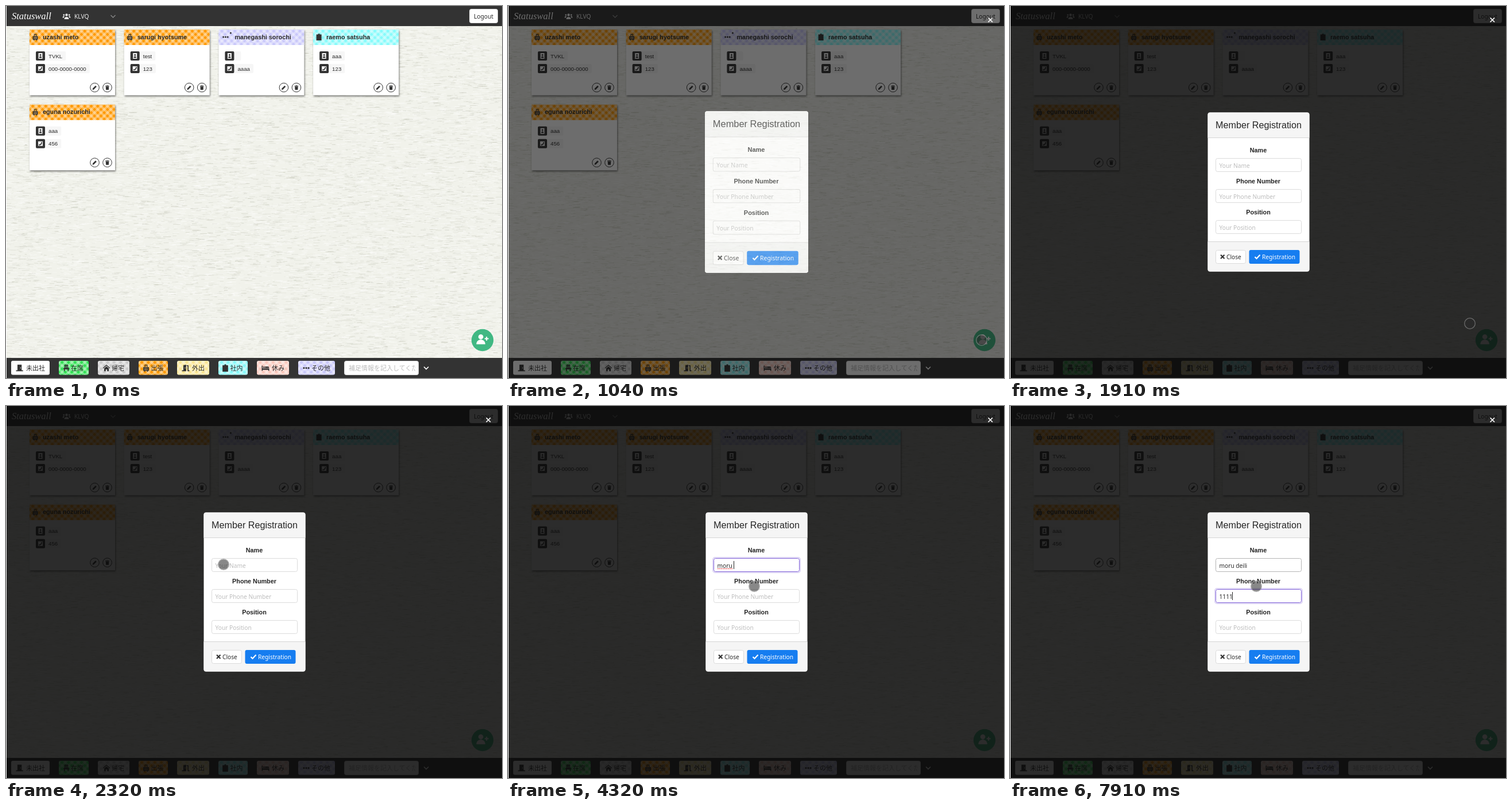
An HTML page with a canvas for the animation above (8 s loop, 864 px wide and 648 px high).

```html
<!DOCTYPE html>
<html lang="ja">
<head>
<meta charset="utf-8">
<title>Member board</title>
<style>
  html, body { margin: 0; width: 100%; height: 100%; overflow: hidden; background: #fff; }
  canvas, svg { position: absolute; left: 0; top: 0; }
  text { white-space: pre; font: 10.2px "Noto Sans", "Noto Sans CJK JP", sans-serif; fill: #2b2b2b; }
  .plain { font: 9.7px "Liberation Sans", sans-serif; }
  .bold { font: bold 10.8px "Liberation Sans", sans-serif; }
  .title { font: 16.15px "Liberation Sans", sans-serif; }
  .brand { font: italic 16.5px "Liberation Serif", serif; }
  .jp { font: 11px "Noto Sans CJK JP", sans-serif; }
  .card { filter: drop-shadow(1.5px 2px 1.5px rgba(0, 0, 0, .5)); }
  #modal { transform-origin: 433px 324px; }
</style>
</head>
<body>
<canvas id="paper" width="864" height="648"></canvas>
<svg id="stage" width="864" height="648" viewBox="0 0 864 648"></svg>
<script>
const LOOP = 8000;
const DARK = '#333';
const $ = id => document.getElementById(id);

// ---------- woven paper ----------
function drawPaper() {
  const ctx = $('paper').getContext('2d');
  let seed = 7;
  const random = () => (seed = (seed * 16807) % 2147483647) / 2147483647;
  ctx.fillStyle = '#f1f2eb';
  ctx.fillRect(0, 0, 864, 648);
  for (let i = 0; i < 22000; i++) {
    const x = random() * 880 - 16, y = 35 + random() * 580, length = 2 + random() * 12;
    ctx.strokeStyle = i % 2 ? `rgba(140,142,120,${0.06 + random() * 0.18})` : 'rgba(255,255,255,.5)';
    ctx.lineWidth = 0.6 + random() * 0.5;
    ctx.beginPath();
    ctx.moveTo(x, y);
    ctx.lineTo(x + length, y + random() * 0.8 - 0.4);
    ctx.stroke();
  }
}

// ---------- drawing helpers ----------
const rect = (x, y, w, h, fill, extra = '') =>
  `<rect x="${x}" y="${y}" width="${w}" height="${h}" fill="${fill}" ${extra}/>`;
const circle = (x, y, r, fill, extra = '') =>
  `<circle cx="${x}" cy="${y}" r="${r}" fill="${fill}" ${extra}/>`;
const text = (x, y, value, kind = '', fill = '#2b2b2b', extra = '') =>
  `<text x="${x}" y="${y}" class="${kind}" style="fill:${fill}" ${extra}>${value}</text>`;
const line = (d, color, width) =>
  `<path d="${d}" fill="none" stroke="${color}" stroke-width="${width}"/>`;
const group = (x, y, content) => `<g transform="translate(${x} ${y})">${content}</g>`;

// Shapes on a 16 x 16 grid
const ICONS = {
  dots: 'M1 8a2 2 0 1 1 4 0a2 2 0 1 1-4 0M6 8a2 2 0 1 1 4 0a2 2 0 1 1-4 0M11 8a2 2 0 1 1 4 0a2 2 0 1 1-4 0',
  luggage: 'M5 6V1h6v5h3v8h-2v2h-2v-2H6v2H4v-2H2V6zM6.5 6h3V2.5h-3zM4 8h8v1H4zM4 11h8v1H4z',
  clipboard: 'M2 2h4a2 2 0 0 1 4 0h4v14H2z',
  door: 'M3 1h9v12h3v2H0v-2h3zM9 7h1.5v2H9z',
  doorOpen: 'M3 2l6-1v14H0v-2h3zM10 2h4v11h2v2h-4V4h-2zM6 7h1.5v2H6z',
  chair: 'M4 1h8v7h2v3h-1v4h-2v-4H5v4H3v-4H2V8h2zM6 3v5h1V3zM9 3v5h1V3z',
  house: 'M8 1l8 7-1 1.2L8 3 1 9.2 0 8zM8 4.5l5 4.5v6H9.5v-4h-3v4H3V9z',
  bed: 'M0 3h2v6h14v5h-2v-2H2v2H0zM7 5h6a3 3 0 0 1 3 3H7zM3 6.5a1.7 1.7 0 1 1 3.4 0a1.7 1.7 0 1 1-3.4 0',
  pencil: 'M1 15l1-4.5 8.5-8.5 3.5 3.5-8.5 8.5z',
  trash: 'M2 2h4l1-1h2l1 1h4v2H2zM3 5h10l-.7 10H3.7z',
  badge: 'M2 0h12a2 2 0 0 1 2 2v12a2 2 0 0 1-2 2H2a2 2 0 0 1-2-2V2a2 2 0 0 1 2-2zM4.5 3v10h7V3zM6.5 6.2a1.5 1.5 0 1 1 3 0a1.5 1.5 0 1 1-3 0M5.8 11.5c0-4 4.4-4 4.4 0z',
  phone: 'M2 0h12a2 2 0 0 1 2 2v12a2 2 0 0 1-2 2H2a2 2 0 0 1-2-2V2a2 2 0 0 1 2-2zM4 4v8h8V4zM5 11l.5-2 1.5.4 2.4-2.4-.4-1.5 2-.5c0 4-2 6-6 6z',
  users: 'M5.3 5a2.7 2.7 0 1 1 5.4 0a2.7 2.7 0 1 1-5.4 0M3 14c0-6.5 10-6.5 10 0zM.5 5a1.7 1.7 0 1 1 3.4 0a1.7 1.7 0 1 1-3.4 0M12.1 5a1.7 1.7 0 1 1 3.4 0a1.7 1.7 0 1 1-3.4 0M-.5 11c0-4 3-4 4-3l-1.5 3zM16.5 11c0-4-3-4-4-3l1.5 3z',
  userPlus: 'M2.2 4.2a3.5 3.5 0 1 1 7 0a3.5 3.5 0 1 1-7 0M-.5 14.5c0-8.5 12.4-8.5 12.4 0zM13 4h1.5v2h2v1.5h-2v2H13v-2h-2V6h2z'
};
const icon = (name, cx, cy, size, fill = DARK) =>
  `<path d="${ICONS[name]}" fill="${fill}" fill-rule="evenodd" transform="translate(${cx - size / 2} ${cy - size / 2}) scale(${size / 16})"/>`;

const CHECKS = { green: '#2fe052', gray: '#cacaca', orange: '#ff9800', yellow: '#fbe591', cyan: '#85fbfb', pink: '#fbc8bc', lilac: '#c9c8fa' };
const checkPattern = ([name, color]) =>
  `<pattern id="${name}" width="8" height="8" patternUnits="userSpaceOnUse" patternTransform="rotate(45)">
    ${rect(0, 0, 8, 8, color)}${rect(0, 0, 4, 8, '#fff', 'opacity=".35"')}${rect(0, 0, 8, 4, '#fff', 'opacity=".35"')}
  </pattern>`;

const measurer = document.createElement('canvas').getContext('2d');
function textWidth(value, font) {
  measurer.font = font;
  return measurer.measureText(value).width;
}

// ---------- board ----------
function card(column, row, color, symbol, name, position, phone) {
  const detail = (top, glyph, value) =>
    rect(11, top, 28 + textWidth(value, '9.7px "Liberation Sans"'), 16, '#f6f6f6', 'rx="2"') +
    icon(glyph, 19, top + 8, 16) + text(33, top + 11.5, value, 'plain');
  const action = (x, glyph) =>
    circle(x, 101, 7.8, '#fff', `stroke="${DARK}"`) + icon(glyph, x, 101, 9);
  const wide = symbol === 'dots';
  return group(41 + column * 164.7, 41 + row * 130.7,
    rect(0, 0, 149, 114.5, '#fff', 'class="card"') +
    rect(0, 0, 149, 27, `url(#${color})`) +
    icon(symbol, wide ? 12 : 10, 13, 12) + (wide ? circle(21, 6, 1.5, DARK) : '') +
    text(wide ? 28 : 23, 16.5, name, 'bold') +
    detail(38, 'badge', position) + detail(60, 'phone', phone) +
    action(113.5, 'pencil') + action(135.5, 'trash'));
}

const statusButton = ([x, width, fill, symbol, label, iconX, labelX]) =>
  group(x, 618,
    rect(0, 0, width, 24.5, fill, 'rx="3"') + icon(symbol, iconX - x, 12.5, 13) +
    text(labelX - x, 16.5, label, 'jp'));

function board() {
  const statuses = [
    [9, 67, '#fff', 'door', '未出社', 24, 35],
    [92, 52, 'url(#green)', 'chair', '在席', 105, 113],
    [160, 55, 'url(#gray)', 'house', '帰宅', 175, 184],
    [231, 51, 'url(#orange)', 'luggage', '出張', 244, 252.5],
    [298, 56, 'url(#yellow)', 'doorOpen', '外出', 313, 324],
    [370, 51, 'url(#cyan)', 'clipboard', '社内', 382, 390.5],
    [437, 56, 'url(#pink)', 'bed', '休み', 452, 463],
    [509, 64, 'url(#lilac)', 'dots', 'その他', 523, 532]
  ];
  return rect(0, 0, 864, 35, DARK) +
    text(10, 22.5, 'Statuswall', 'brand', '#fff') +
    icon('users', 105.5, 18, 13, '#eee') + text(119, 21.5, 'KLVQ', '', '#eee') +
    line('M182.5 16l4 4 4-4', '#888', 1.3) +
    rect(807.5, 5.5, 49, 24, '#fff', 'rx="3" stroke="#dbdbdb"') + text(815, 21.5, 'Logout') +
    card(0, 0, 'orange', 'luggage', 'uzashi meto', 'TVKL', '000-0000-0000') +
    card(1, 0, 'orange', 'luggage', 'sarugi hyotsume', 'test', '123') +
    card(2, 0, 'lilac', 'dots', 'manegashi sorochi', '', 'aaaa') +
    card(3, 0, 'cyan', 'clipboard', 'raemo satsuha', 'aaa', '123') +
    card(0, 1, 'orange', 'luggage', 'eguna nozurichi', 'aaa', '456') +
    circle(830, 582, 19.2, '#41b883') + icon('userPlus', 830, 581, 20, '#fff') +
    rect(0, 613, 864, 35, DARK) + statuses.map(statusButton).join('') +
    rect(589.5, 618.5, 129, 24, '#fff', 'rx="3" stroke="#dbdbdb"') +
    `<svg x="590" y="613" width="123" height="35">${text(7, 21.5, '補足情報を記入してください', 'jp', '#bbb')}</svg>` +
    line('M728 628.5l4 4 4-4', '#fff', 1.7);
}

// ---------- dialog ----------
const fields = [
  { label: 'Name', hint: 'Your Name', y: 277, value: 'moru deili', focus: 2700, blur: 6300, misspelt: 4320,
    keys: [3540, 3790, 4030, 4180, 4320, 4550, 4630, 4800, 5190, 5290] },
  { label: 'Phone Number', hint: 'Your Phone Number', y: 331, value: '1111', focus: 6300, blur: LOOP, misspelt: LOOP,
    keys: [6900, 7130, 7360, 7910] },
  { label: 'Position', hint: 'Your Position', y: 385, value: '', focus: LOOP, blur: LOOP, misspelt: LOOP, keys: [] }
];

const dialogField = ({ label, y }, i) =>
  text(432.5, y - 22, label, 'bold', '#222', 'text-anchor="middle"') +
  rect(356.8, y - 13.2, 152.4, 26.4, 'none', `id="glow${i}" rx="4" stroke="#7957d5" stroke-opacity=".3" stroke-width="1.5"`) +
  rect(358.5, y - 11.5, 149, 23, '#fff', `id="box${i}" rx="3"`) +
  text(364.5, y + 4.5, '', '', '#2b2b2b', `id="value${i}"`) +
  `<path id="squiggle${i}" fill="none" stroke="#e33" stroke-dasharray="2 1"/>` +
  rect(0, y - 7, 1, 14, '#222', `id="caret${i}"`);

// Backdrop and modal fade as one layer, so the page shows through both alike
const dialog = () =>
  `<g id="layer">
    ${rect(0, 0, 864, 648, '#0a0a0a', 'opacity=".86"')}
    ${line('M836.5 20.5l7.5 7.5m0-7.5l-7.5 7.5', '#fff', 1.7)}
    <g id="modal">
      ${rect(344.5, 185.5, 177, 277, '#fff', 'rx="4"')}
      <path d="M344.5 229v-39.5q0-4 4-4h169q4 0 4 4V229zM344.5 411v47.5q0 4 4 4h169q4 0 4-4V411z" fill="#f5f5f5"/>
      ${line('M344.5 229.5h177m-177 181h177', '#d5d5d5', 1)}
      ${text(433, 212.5, 'Member Registration', 'title', '#262626', 'text-anchor="middle"')}
      ${fields.map(dialogField).join('')}
      ${rect(358.5, 425.5, 52, 23, '#fff', 'rx="3" stroke="#dbdbdb"')}
      ${line('M367 433.5l6.5 6.5m0-6.5l-6.5 6.5', DARK, 2.2)}${text(377, 441, 'Close')}
      ${rect(416.5, 425, 88, 24, '#167df0', 'rx="3"')}
      ${line('M426.5 437l3 3 6-6.5', '#fff', 2.2)}${text(439, 441, 'Registration', '', '#fff')}
    </g>
  </g>`;

function updateField(field, i, t) {
  const { y, hint, keys, focus, blur, misspelt } = field;
  const typed = keys.filter(key => key <= t).length;
  const value = field.value.slice(0, typed);
  const focused = t >= focus && t < blur;
  const sinceInput = t - (typed ? keys[typed - 1] : focus);
  const font = '10.2px "Noto Sans"';

  $('glow' + i).style.display = focused ? '' : 'none';
  $('box' + i).setAttribute('stroke', focused ? '#8062d8' : typed ? '#b5b5b5' : '#dbdbdb');
  $('value' + i).textContent = value || hint;
  $('value' + i).style.fill = typed ? '#2b2b2b' : '#bdbdbd';
  $('caret' + i).style.display = focused && sinceInput % 1020 < 510 ? '' : 'none';
  $('caret' + i).setAttribute('x', Math.round(364 + textWidth(value, font)));

  const underlined = focused && t >= misspelt;
  const wordWidth = textWidth(value.split(' ')[0], font);
  $('squiggle' + i).setAttribute('d', underlined ? `M365 ${y + 6.5}h${wordWidth}` : '');
}

// ---------- pointer ----------
// Each glide: start, end, number of positions, then a quadratic curve
const glides = [
  [70, 590, 8, [815, 660], [770, 515], [826, 587]],
  [1040, 1210, 3, [825, 582], [797, 548], [801, 553]],
  [1910, 2310, 6, [801, 553], [520, 43], [379, 276]],
  [2390, 2550, 3, [366, 282], [358, 292], [375, 279]],
  [2770, 2850, 2, [400, 297], [414, 306], [429, 314]]
];

function pointerAt(t) {
  const glide = glides.filter(([start]) => start <= t).pop();
  if (!glide) return [-50, -50];
  const [start, end, count, from, bend, to] = glide;
  const step = Math.floor((t - start) / (end - start) * (count - 1));
  const u = Math.min(1, step / (count - 1));
  return [0, 1].map(k => (1 - u) ** 2 * from[k] + 2 * u * (1 - u) * bend[k] + u * u * to[k]);
}

const pointer = `<g id="pointer">${circle(0, 0, 8.8, 'rgba(42,42,42,.56)')}${circle(0, 0, 9.3, 'none', 'stroke="rgba(136,136,136,.7)" stroke-width="1.3"')}</g>`;

// ---------- playback ----------
function render(t) {
  const shown = t < 1040 ? 0 : t < 1130 ? 0.69 : 1;
  $('layer').setAttribute('opacity', shown);
  $('modal').style.transform = `scale(${shown < 1 ? 1.017 : 1})`;
  fields.forEach((field, i) => updateField(field, i, t));
  const pressed = t >= 740 && t < 830;
  $('pointer').setAttribute('transform', `translate(${pointerAt(t)}) scale(${pressed ? 1.1 : 1})`);
}

drawPaper();
$('stage').innerHTML = `<defs>${Object.entries(CHECKS).map(checkPattern).join('')}</defs>` +
  board() + dialog() + pointer + rect(0, 0, 1, 648, '#fff');

const began = performance.now();
function tick() {
  render((performance.now() - began) % LOOP);
  requestAnimationFrame(tick);
}
tick();
</script>
</body>
</html>
```
